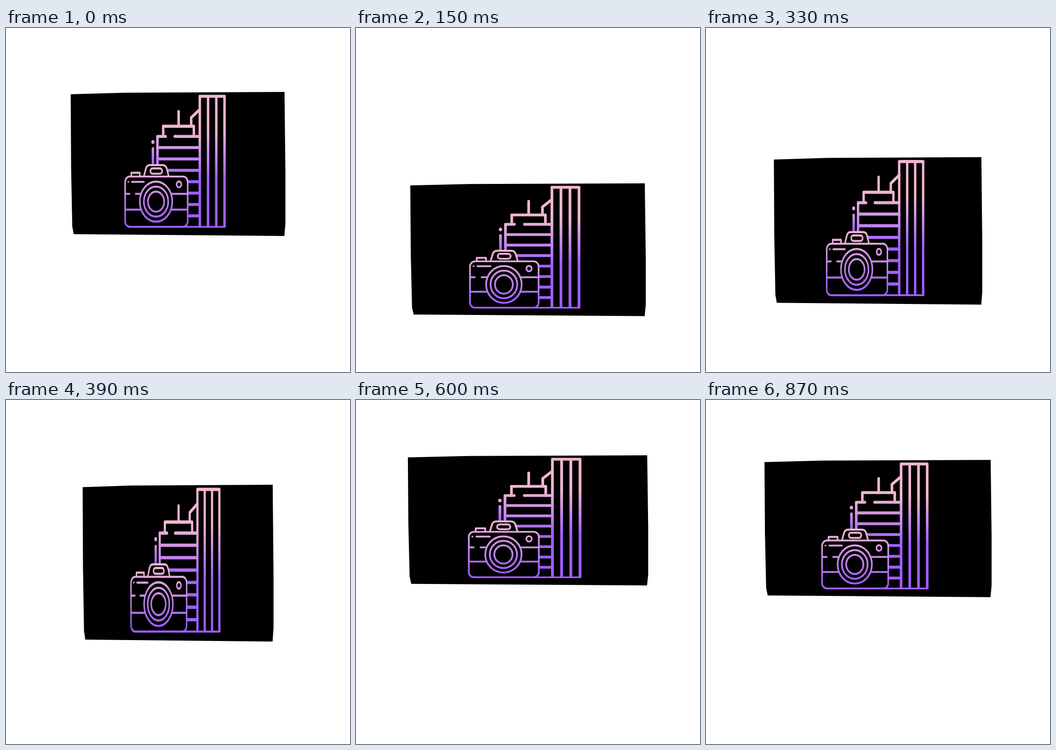
Animation, 748 px wide and 748 px high, one loop 0.9 s. Source, as an HTML page with a canvas:

```html
<!DOCTYPE html>
<html lang="en">
<head>
<meta charset="utf-8">
<title>Bouncing city camera</title>
<style>
html, body { margin: 0; width: 100%; height: 100%; overflow: hidden; background: #fff; }
canvas { display: block; width: 748px; height: 748px; }
</style>
</head>
<body>
<canvas id="stage" width="748" height="748"></canvas>
<script>
const ctx = document.getElementById('stage').getContext('2d');
const LOOP = 900, STEP = 30, LANDING = 240;
const ART = { x: 374.3, y: 262, w: 522, h: 284 };

// A smooth bell that is 1 at zero and fades out around the given reach
const bell = (t, reach, power = 2) => Math.exp(-((Math.abs(t) / reach) ** power));

// The fall mirrors the rise; u is the time in ms to or from the landing
function pose(u) {
  const w = 523 + 79 * bell(u, 91, 3) - 111 * bell(u - 150, 90.6);
  return { y: 261 + 268 * bell(u, 161, 2.15), w, h: ART.h - 0.54 * (w - ART.w) };
}

function gradient(y0, y1, ...stops) {
  const g = ctx.createLinearGradient(0, y0, 0, y1);
  stops.forEach(([at, color]) => g.addColorStop(at, color));
  return g;
}

const PINK = '#f0b6d0', VIOLET = '#a05eff';
const cityInk = gradient(195, 294, [0, PINK], [1, VIOLET]);
const mastInk = gradient(215, 264, [0, '#deaadb'], [1, VIOLET]);
const cameraInk = gradient(268, 375, [0, PINK], [1, VIOLET]);

function pen(ink, width) {
  ctx.strokeStyle = ctx.fillStyle = ink;
  ctx.lineWidth = width;
}

function trace(...xy) {
  ctx.beginPath();
  for (let i = 0; i < xy.length; i += 2) ctx.lineTo(xy[i], xy[i + 1]);
}

function line(...xy) {
  trace(...xy);
  ctx.stroke();
}

function circle(x, y, r, method = 'stroke') {
  ctx.beginPath();
  ctx.arc(x, y, r, 0, 2 * Math.PI);
  ctx[method]();
}

function roundBox(x, y, w, h, r) {
  ctx.beginPath();
  ctx.roundRect(x, y, w, h, r);
}

function blackThenStroke(ink, width) {
  ctx.fillStyle = '#000';
  ctx.fill();
  pen(ink, width);
  ctx.stroke();
}

function drawCard() {
  ctx.fillStyle = '#000';
  trace(113.2, 125, 245, 122, 632.8, 120.5, 635, 280, 635, 380, 632.5, 404,
    120.5, 400.5, 117, 385, 114.2, 270);
  ctx.fill();
}

function drawCity() {
  pen(cityInk, 6);
  for (let i = 0; i < 7; i++) line(324, 230 + i * 22.4, 427, 230 + i * 22.4);
  line(324, 285, 324, 208, 344, 208);
  line(366, 208, 427, 208);
  line(338, 208, 338, 188, 412.5, 188, 412.5, 208);
  line(375.5, 159, 375.5, 188);
  line(406, 188, 406, 171, 427, 155);
  ctx.lineCap = 'butt';
  for (let i = 0; i < 4; i++) line(427 + i * 20, 129, 427 + i * 20, 387);
  ctx.lineCap = 'round';
  line(427, 129, 487, 129);
  pen(cityInk, 3.5);
  line(385, 386, 488, 386);

  pen(mastInk, 6);
  circle(313, 219, 3.8, 'fill');
  line(313, 232, 313, 268);
}

function drawCamera() {
  ctx.beginPath();
  ctx.moveTo(291, 287);
  ctx.lineTo(296, 271);
  ctx.quadraticCurveTo(298.5, 264.5, 305, 264.5);
  ctx.lineTo(337, 264.5);
  ctx.quadraticCurveTo(344, 264.5, 346.5, 271);
  ctx.lineTo(351.5, 287);
  blackThenStroke(cameraInk, 4);
  roundBox(307, 271, 28.5, 10.5, 5.2);
  ctx.stroke();
  line(260.5, 286, 260.5, 279.5, 281, 279.5, 281, 286);

  roundBox(245.5, 287, 152, 99, 11);
  blackThenStroke(cameraInk, 3.8);
  circle(253.2, 297.5, 2, 'fill');
  line(262, 297.5, 291, 297.5);
  line(246, 321, 256, 321);
  line(271, 321, 397, 321);
  line(246, 352, 397, 352);
  circle(376.3, 302.5, 5.8);

  circle(320.6, 336.4, 39.4, 'fill');
  for (const r of [39.4, 29.6, 19.8]) {
    ctx.beginPath();
    ctx.arc(320.6, 336.4, r, 0, 2 * Math.PI);
    blackThenStroke(cameraInk, 4);
  }
}

function render(ms) {
  const now = Math.floor((ms % LOOP) / STEP) * STEP + STEP / 2;
  const gap = Math.abs(now - LANDING);
  const p = pose(Math.min(gap, LOOP - gap));

  ctx.setTransform(1, 0, 0, 1, 0, 0);
  ctx.fillStyle = '#fff';
  ctx.fillRect(0, 0, 748, 748);
  ctx.translate(ART.x, p.y);
  ctx.scale(p.w / ART.w, p.h / ART.h);
  ctx.translate(-ART.x, -ART.y);
  ctx.lineCap = 'round';
  ctx.lineJoin = 'round';
  drawCard();
  drawCity();
  drawCamera();
}

const start = performance.now();
function tick() {
  render(performance.now() - start);
  requestAnimationFrame(tick);
}
tick();
</script>
</body>
</html>
```
